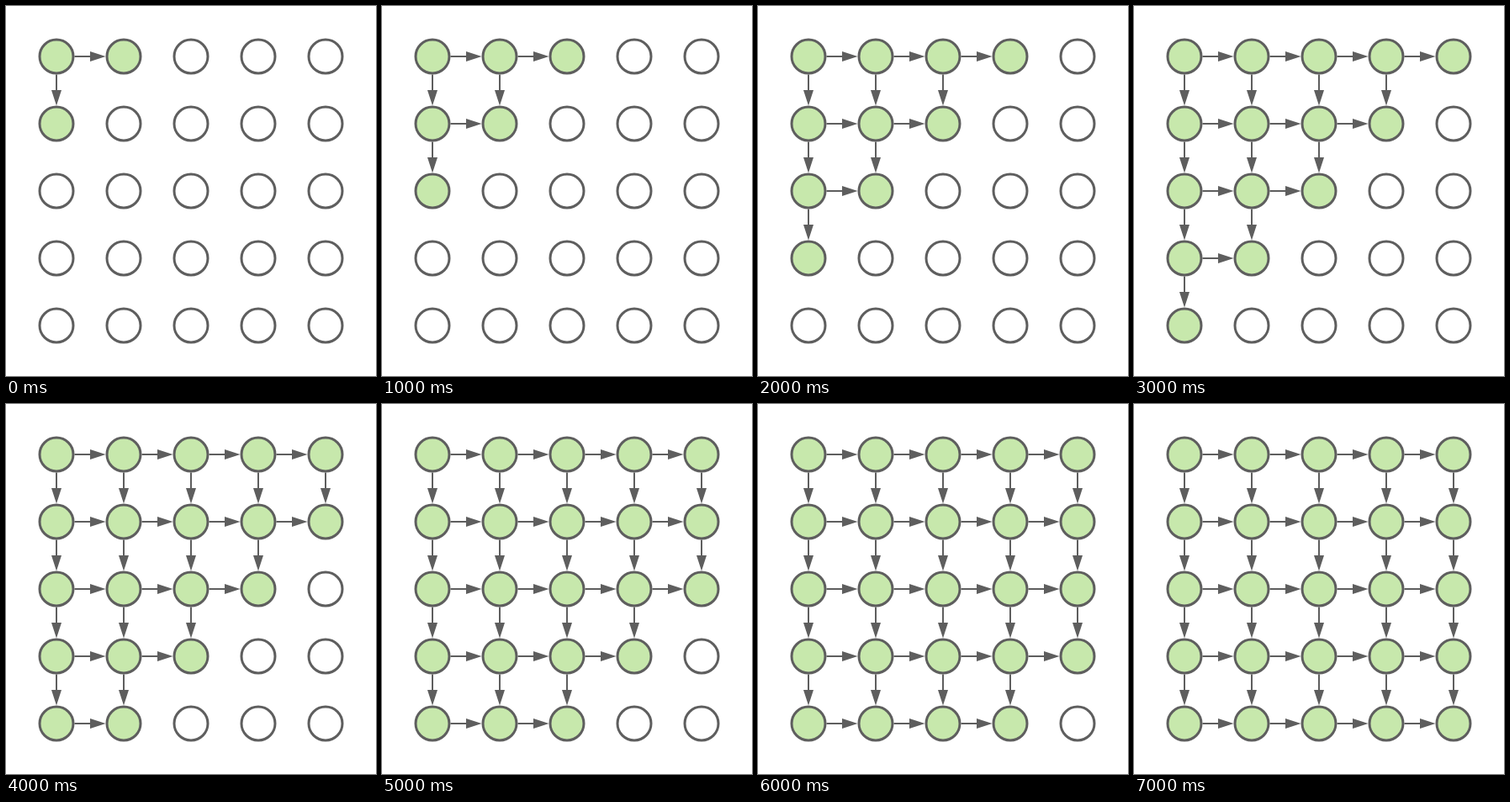
Write an HTML page that moves like this. It is 440 px wide and 440 px high and loops after 8000 ms.

```html
<!DOCTYPE html>
<html lang="en">
<head>
<meta charset="utf-8">
<title>Grid wavefront</title>
<style>
  html, body { margin: 0; width: 100%; height: 100%; overflow: hidden; background: #fff; }
  svg { display: block; width: 100%; height: 100%; }
  .ring { fill: none; stroke: #5e5e5e; stroke-width: 3; }
  .fill { fill: #c7e8ac; }
  .arrow { fill: #5e5e5e; }
  .step { animation: 8s step-end infinite; }
  .s1 { animation-name: s1; }
  .s2 { animation-name: s2; }
  .s3 { animation-name: s3; }
  .s4 { animation-name: s4; }
  .s5 { animation-name: s5; }
  .s6 { animation-name: s6; }
  .s7 { animation-name: s7; }
  @keyframes s1 { from { opacity: 0 } 12.5%, to { opacity: 1 } }
  @keyframes s2 { from { opacity: 0 } 25%, to { opacity: 1 } }
  @keyframes s3 { from { opacity: 0 } 37.5%, to { opacity: 1 } }
  @keyframes s4 { from { opacity: 0 } 50%, to { opacity: 1 } }
  @keyframes s5 { from { opacity: 0 } 62.5%, to { opacity: 1 } }
  @keyframes s6 { from { opacity: 0 } 75%, to { opacity: 1 } }
  @keyframes s7 { from { opacity: 0 } 87.5%, to { opacity: 1 } }
</style>
</head>
<body>
<svg id="stage" viewBox="0 0 440 440"></svg>
<script>
  const SIZE = 5, GAP = 80, MARGIN = 60, RADIUS = 20;
  const ARROW = 'M21.5-1H40V-6L58.5 0L40 6V1H21.5Z';
  const steps = Array.from({ length: 8 }, () => '');
  let rings = '';

  const circle = (x, y, name) =>
    `<circle class="${name}" cx="${x}" cy="${y}" r="${RADIUS}"/>`;
  const arrow = (x, y, angle) =>
    `<path class="arrow" d="${ARROW}" transform="translate(${x} ${y}) rotate(${angle})"/>`;

  for (let row = 0; row < SIZE; row++) {
    for (let col = 0; col < SIZE; col++) {
      const x = MARGIN + col * GAP, y = MARGIN + row * GAP;
      const diagonal = row + col;
      // A node lights up together with the arrows that lead into it.
      steps[Math.max(0, diagonal - 1)] += circle(x, y, 'fill');
      if (col < SIZE - 1) steps[diagonal] += arrow(x, y, 0);
      if (row < SIZE - 1) steps[diagonal] += arrow(x, y, 90);
      rings += circle(x, y, 'ring');
    }
  }

  document.getElementById('stage').innerHTML =
    steps.map((shapes, i) => `<g class="step s${i}">${shapes}</g>`).join('') + rings;
</script>
</body>
</html>
```
